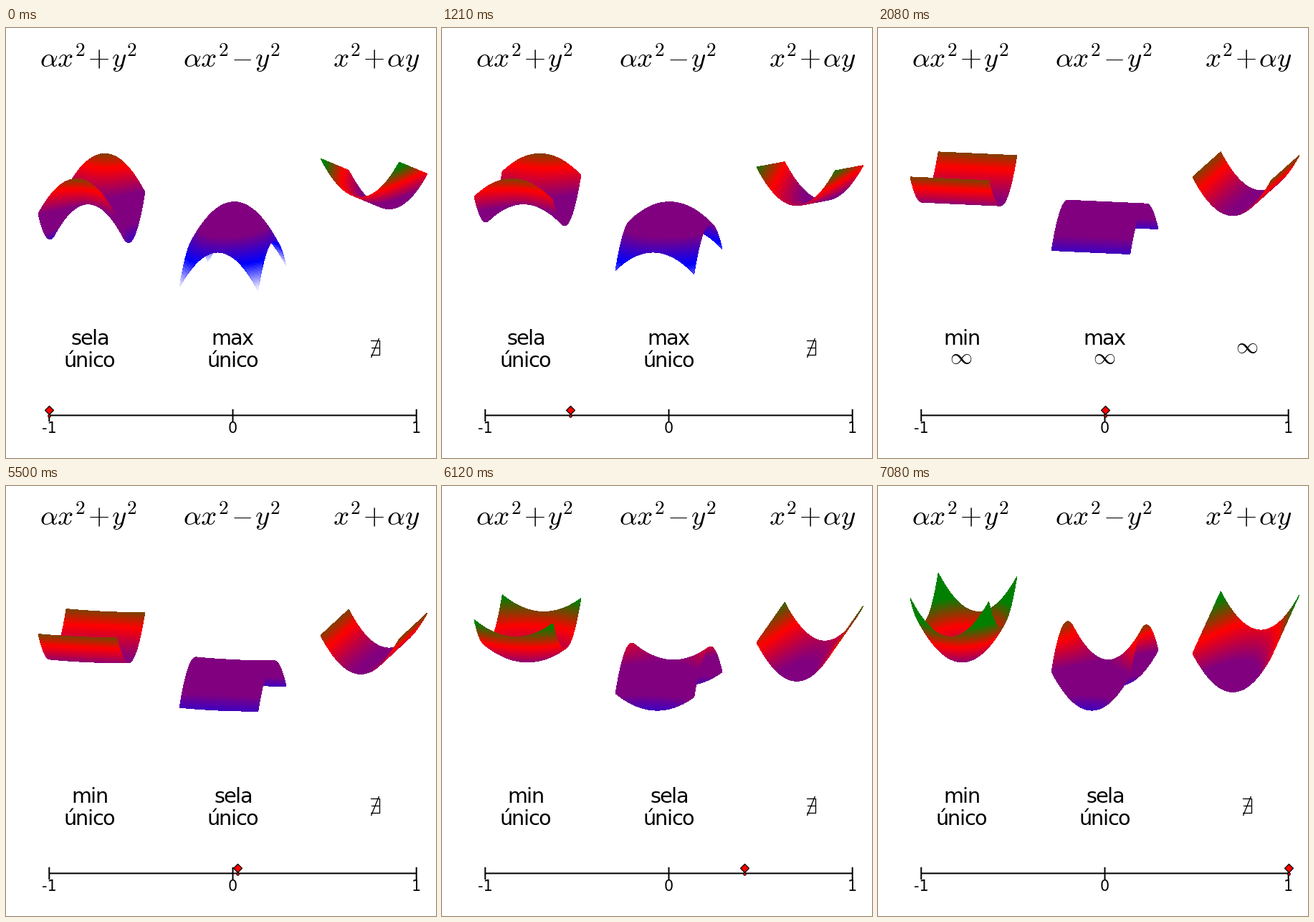
These frames come from a looping animation (600x600 px, 8000 ms). A matplotlib script:

```python
import numpy as np
import matplotlib.pyplot as plt
from matplotlib.animation import FuncAnimation
from matplotlib.colors import LinearSegmentedColormap

plt.rcParams["font.family"] = "DejaVu Sans"
plt.rcParams["mathtext.fontset"] = "cm"

SIZE, DPI = 600, 100
LOOP, TICK = 8000, 20           # ms
STEP_RATE, STEPS = 24, 39       # steps per second, steps per unit of alpha
STARTS = (500, 5500)            # ms at which the slider begins to move
N = 64                          # cells along each side of a surface

fig = plt.figure(figsize=(SIZE / DPI, SIZE / DPI), dpi=DPI, facecolor="white")
ax = fig.add_axes([0, 0, 1, 1])
ax.set_xlim(0, SIZE)
ax.set_ylim(SIZE, 0)
ax.set_autoscale_on(False)
ax.axis("off")

# Evenly spaced height colours over z in [-8, 8]
cmap = LinearSegmentedColormap.from_list(
    "height", ["white", "blue", "purple", "purple", "red", "green", "green"],
    N=1024)

# Rows run from far to near, so nearer cells cover farther ones
X, Y = np.meshgrid(np.linspace(-2, 2, N + 1), np.linspace(2, -2, N + 1))
SURFACES = [
    (119.4, lambda a: a * X**2 + Y**2),
    (316.5, lambda a: a * X**2 - Y**2),
    (513.4, lambda a: X**2 + a * Y),
]
COLUMNS = (115.5, 315.5, 515)


def project(cx, z):
    sx = cx + 27.4 * X + 9.8 * Y
    sy = 244.2 + 1.25 * X - 8.75 * Y - 12.83 * z
    return sx, sy


def label(x, y, s, px, **kw):
    return ax.text(x, y, s, fontsize=px * 72 / DPI, ha="center",
                   va="baseline", **kw)


def tight(word):
    """Sans-serif word with slightly closed-up letters."""
    return "$" + r"\hspace{-0.05}".join(rf"\mathrm{{{c}}}" for c in word) + "$"


def stroke(xs, ys, lw):
    return ax.plot(xs, ys, color="black", lw=lw, snap=False,
                   solid_capstyle="butt")[0]


def draw_surface(cx, z):
    sx, sy = project(cx, z)
    mid = (z[1:, 1:] + z[1:, :-1] + z[:-1, 1:] + z[:-1, :-1]) / 4
    return ax.pcolormesh(sx, sy, mid, cmap=cmap, vmin=-8, vmax=8,
                         shading="flat", antialiased=False, snap=False)


def axis_x(a):
    return 316.5 + 256.2 * a


def binary(left, op, right):
    return rf"${left}\hspace{{0.067}}{{{op}}}\hspace{{0.067}}{right}$"


for x, terms in zip((115.5, 315.5, 516.5), ((r"\alpha x^2", "+", "y^2"),
                                            (r"\alpha x^2", "-", "y^2"),
                                            ("x^2", "+", r"\alpha y"))):
    label(x, 55, binary(*terms), 38.9)

stroke([axis_x(-1), axis_x(1)], [540.5, 540.5], 1.44)
for a in (-1, 0, 1):
    stroke([axis_x(a)] * 2, [532, 549], 1.44)
    label(axis_x(a), 565, str(a), 20.8)

dot, = ax.plot([], [], "o", ms=2.6, mfc="red", mec="black", mew=0.72, zorder=5)
gem, = ax.plot([], [], "D", ms=5.8, mfc="red", mec="black", mew=0.9, zorder=6)

sans = dict(math_fontfamily="dejavusans")
kinds = [label(x + 0.8, 442, "", 28.8, **sans) for x in COLUMNS[:2]]
counts = [label(x + 0.5, 473, tight("único"), 28.8, **sans)
          for x in COLUMNS[:2]]
infinities = [label(x, y, r"$\infty$", 31)
              for x, y in zip(COLUMNS, (468, 468, 453))]
no_solution = [
    stroke([509, 521.5, 521.5, 509], [436.5, 436.5, 456.5, 456.5], 0.95),
    stroke([510, 521.5], [446.5, 446.5], 0.95),
    stroke([509.5, 520.5], [460, 433], 0.95),
]

meshes = []
shown = None


def alpha_at(frame):
    # Looking ahead within the tick keeps steps on their rounded times
    t = frame * TICK + 15
    done = [(t - s) * STEP_RATE // 1000 + 1 for s in STARTS]
    return sum(min(max(d, 0), STEPS) for d in done) / STEPS - 1


def update(frame):
    global shown
    a = alpha_at(frame)
    if a == shown:
        return
    shown = a
    while meshes:
        meshes.pop().remove()
    for cx, height in SURFACES:
        meshes.append(draw_surface(cx, height(a)))

    flat = a == 0
    kinds[0].set_text(tight("sela" if a < 0 else "min"))
    kinds[1].set_text(tight("sela" if a > 0 else "max"))
    for t in counts + no_solution:
        t.set_visible(not flat)
    for t in infinities:
        t.set_visible(flat)
    dot.set_data([axis_x(a)], [540.5])
    gem.set_data([axis_x(a)], [532.5])


anim = FuncAnimation(fig, update, frames=LOOP // TICK, init_func=lambda: None,
                     interval=TICK, repeat=True, repeat_delay=0,
                     cache_frame_data=False)
plt.show()
```
